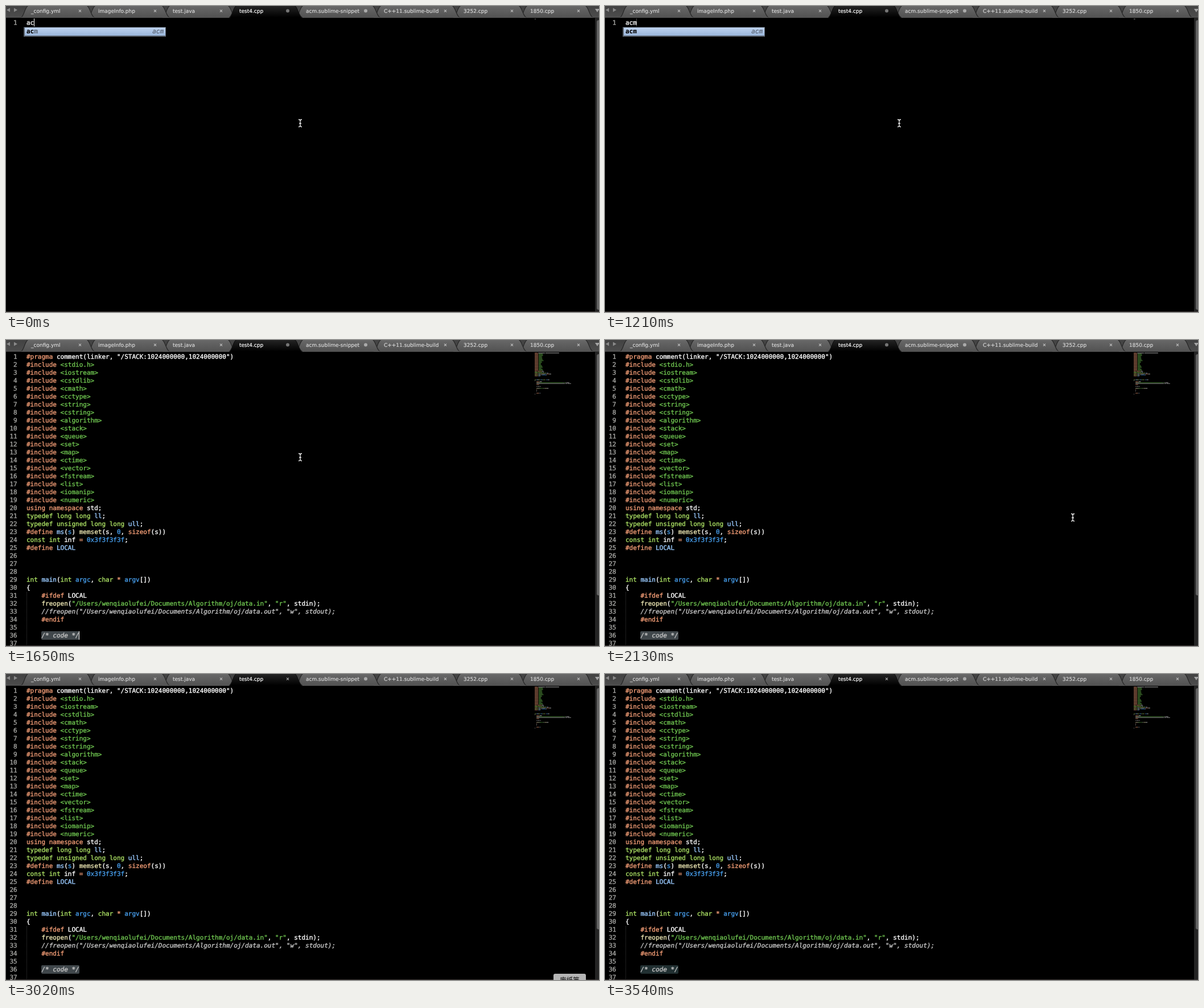
An HTML page with a canvas for the animation above (3640 ms loop, 1042 by 538 pixels).

```html
<!DOCTYPE html>
<html lang="en">
<head>
<meta charset="utf-8">
<title>Snippet expansion in a code editor</title>
<style>
html, body { margin: 0; width: 100%; height: 100%; overflow: hidden; background: #000; }
canvas { display: block; }
</style>
</head>
<body>
<canvas id="stage" width="1042" height="538"></canvas>
<script>
const LOOP = 3640;
const W = 1042, H = 538;
const CODE_X = 36, BASELINE = 33, LINE_H = 14, CHAR_W = 6.622;
const MONO = '11px "DejaVu Sans Mono", monospace';
const UI = '9px "DejaVu Sans", sans-serif';
const ctx = document.getElementById('stage').getContext('2d');
ctx.textRendering = 'geometricPrecision';
ctx.lineJoin = 'round';

// One letter per syntax colour; "~" separates tokens in a line.
const COLORS = {
  w: '#fafafa', o: '#ee9a74', g: '#6cc04e', t: '#a8dc62', b: '#459ae6',
  f: '#9acaff', y: '#e8e2b0', c: '#c4c4c4'
};
const parse = line => line ? line.split('~').map(s => [s[0], s.slice(1)]) : [];
const headers = ('stdio.h iostream cstdlib cmath cctype string cstring algorithm stack queue ' +
  'set map ctime vector fstream list iomanip numeric').split(' ');
const folder = '/Users/wenqiaolufei/Documents/Algorithm/oj/';
const program = [
  'o#pragma ~wcomment(linker, "/STACK:1024000000,1024000000")',
  ...headers.map(h => `o#include ~g<${h}>`),
  'ousing namespace ~wstd;',
  'ttypedef long long ~fll~w;',
  'ttypedef unsigned long long ~full~w;',
  'o#define ~fms~w(~bs~w) ~ymemset~w(s, ~b0~w, ~osizeof~w(s))',
  'tconst int ~winf ~o= ~b0x3f3f3f3f~w;',
  'o#define ~fLOCAL',
  '', '', '',
  'tint ~fmain~w(~tint ~bargc~w, ~tchar ~o* ~bargv~w[])',
  'w{',
  'w    ~o#ifdef ~wLOCAL',
  `w    ~yfreopen~w(~g"${folder}data.in"~w, ~g"r"~w, stdin);`,
  `w    ~c//freopen("${folder}data.out", "w", stdout);`,
  'w    ~o#endif',
  '',
  'w    ~c/* code */',
  '',
  'w    ~yprintf~w(~g"time %d"~w, ~yclock~w());',
  'w    ~o#',
  'w    }',
  'w    }',
  '',
  'w    ~oreturn ~b0~w;',
  'w}'
].map(parse);

// label, text x, close button x
const tabs = [
  ['_config.yml', 44, 130], ['imageInfo.php', 162, 262], ['test.java', 293, 378],
  ['test4.cpp', 410, 495], ['acm.sublime-snippet', 527, 632],
  ['C++11.sublime-build', 664, 772], ['3252.cpp', 804, 889], ['1850.cpp', 921, 1006]
];
const ACTIVE = 3, UNSAVED = 4;

// Stepped tracks: [start time, value]
const caretTrack = [[0, 1], [610, .15], [760, 0], [1210, .3], [1360, .65], [1510, 1],
  [2130, 0], [2580, .5], [2720, 1], [3020, 0]];
const pointerTrack = [[0, [517, 206]], [2130, [822, 312]], [2280, [869, 352]],
  [2430, [947, 416]], [2580, null]];
const tooltipTrack = [[0, 0], [3020, 1], [3170, .45], [3320, 0]];
const valueAt = (track, t) => track.filter(([start]) => start <= t).pop()[1];

function rect(x, y, w, h, fill) {
  ctx.fillStyle = fill;
  ctx.fillRect(x, y, w, h);
}

// A thin outline in the fill colour gives the glyphs a heavier smoothing.
function text(str, x, y, color, font = MONO, align = 'left', weight = .4) {
  ctx.font = font;
  ctx.textAlign = align;
  ctx.fillStyle = ctx.strokeStyle = color;
  ctx.lineWidth = weight;
  ctx.fillText(str, x, y);
  ctx.strokeText(str, x, y);
}

function gradient(y0, y1, from, to) {
  const g = ctx.createLinearGradient(0, y0, 0, y1);
  g.addColorStop(0, from);
  g.addColorStop(1, to);
  return g;
}

function polygon(points, fill) {
  ctx.beginPath();
  points.forEach(p => ctx.lineTo(...p));
  ctx.fillStyle = fill;
  ctx.fill();
}

function rounded(x, y, w, h, r, fill) {
  ctx.beginPath();
  ctx.roundRect(x, y, w, h, r);
  ctx.fillStyle = fill;
  ctx.fill();
}

function dot(x, y, fill) {
  ctx.beginPath();
  ctx.arc(x, y, 3, 0, 7);
  ctx.fillStyle = fill;
  ctx.fill();
}

function cross(x, y, stroke) {
  ctx.beginPath();
  ctx.moveTo(x - 2, y - 2); ctx.lineTo(x + 2, y + 2);
  ctx.moveTo(x + 2, y - 2); ctx.lineTo(x - 2, y + 2);
  ctx.strokeStyle = stroke;
  ctx.lineWidth = 1.2;
  ctx.stroke();
}

function drawTab(index, unsaved) {
  const [label, textX, closeX] = tabs[index];
  const active = index === ACTIVE;
  const left = textX - 18, right = closeX + 26;
  ctx.beginPath();
  ctx.moveTo(left, 20.5);
  ctx.bezierCurveTo(left + 6, 19, left + 7, 0, left + 14, -1);
  ctx.lineTo(right - 15, -1);
  ctx.bezierCurveTo(right - 8, 0, right - 7, 19, right, 20.5);
  ctx.fillStyle = active ? gradient(0, 20, '#242424', '#000') : gradient(0, 20, '#686868', '#525252');
  ctx.fill();
  ctx.strokeStyle = active ? '#111' : '#262626';
  ctx.lineWidth = 1.2;
  ctx.stroke();
  text(label, textX, 11.8, active ? '#fff' : '#d8d8d8', UI, 'left', .2);
  if (unsaved) dot(closeX, 8.5, active ? '#757575' : '#aaa');
  else cross(closeX, 8.7, active ? '#aaa' : '#bdbdbd');
}

function drawTabBar(t) {
  rect(0, 0, W, 20, gradient(0, 20, '#424242', '#4c4c4c'));
  polygon([[1, 7], [7, 3.5], [7, 10.5]], '#8a8a8a');
  polygon([[20, 7], [14, 3.5], [14, 10.5]], '#8a8a8a');
  polygon([[1035, 5], [1043, 5], [1039, 11]], '#a5a5a5');
  for (let i = tabs.length - 1; i >= 0; i--) if (i !== ACTIVE) drawTab(i, i === UNSAVED);
  rect(0, 19.5, W, 1, '#5c5c5c');
  drawTab(ACTIVE, t < 2430);
  rect(394, 20, 125, 2, '#000');
}

function drawScrollbar(bottom) {
  rect(1035, 21, 7, H - 21, '#242424');
  rounded(1038, 25, 6, bottom - 25, 3, '#626262');
  rect(0, 537, W, 1, '#3d3837');
}

function drawCaret(x, y, h, alpha) {
  ctx.globalAlpha = alpha;
  rect(x, y, 1, h, '#fff');
  ctx.globalAlpha = 1;
}

function drawLineNumber(n) {
  text(n, 19.7, BASELINE + (n - 1) * LINE_H, '#a2a29f', MONO, 'right');
}

function drawTyping(t) {
  const typed = t < 140 ? 'ac' : 'acm';
  const width = typed.length * CHAR_W;
  drawLineNumber(1);
  text(typed, CODE_X, BASELINE, COLORS.w);
  drawCaret(Math.floor(CODE_X + width), 22, 14, valueAt(caretTrack, t));
  rect(929, 22.5, typed.length * .9, 1, '#777');

  rect(31, 37, 250, 17, '#59616b');
  rect(33, 38, 247, 14, gradient(38, 52, '#bdd2ee', '#9bb7dc'));
  text(typed, CODE_X, 48, '#000', 'bold ' + MONO, 'left', .1);
  text('acm'.slice(typed.length), CODE_X + width, 48, '#55606e');
  text('acm', 277, 48, '#566070', 'italic ' + MONO, 'right', .2);
}

function drawProgram(t) {
  rounded(62, 512, 67, 15, 2, t < 3540 ? '#40474b' : '#213032');
  for (let y = 443; y < 537; y += 2) rect(36, y, 1, 1, '#3a3a3a');

  program.forEach((tokens, row) => {
    let col = 0;
    if (row < 37) drawLineNumber(row + 1);
    for (const [key, str] of tokens) {
      const font = key === 'c' ? 'italic ' + MONO : MONO;
      if (row < 37) text(str, CODE_X + col * CHAR_W, BASELINE + row * LINE_H, COLORS[key], font);
      ctx.globalAlpha = .65;
      for (const word of str.matchAll(/\S+/g)) {
        rect(929 + (col + word.index) * .78, 22.4 + row * 1.68, word[0].length * .78, 1, COLORS[key]);
      }
      ctx.globalAlpha = 1;
      col += str.length;
    }
  });
  drawCaret(128, 512, 15, valueAt(caretTrack, t));
}

function drawPointer([x, y]) {
  ctx.beginPath();
  for (const s of [-1, 1]) {
    ctx.moveTo(x - 3, y + s * 6.5);
    ctx.quadraticCurveTo(x, y + s * 6.5, x, y + s * 4);
    ctx.quadraticCurveTo(x, y + s * 6.5, x + 3, y + s * 6.5);
  }
  ctx.moveTo(x, y - 5); ctx.lineTo(x, y + 5);
  ctx.moveTo(x - 2, y + .5); ctx.lineTo(x + 2, y + .5);
  ctx.strokeStyle = '#eee';
  ctx.lineWidth = 1.3;
  ctx.stroke();
}

function drawTooltip(alpha) {
  ctx.globalAlpha = alpha;
  rounded(962, 527, 57, 20, 3, '#b5b5b5');
  text('废纸篓', 990.5, 541.5, '#111', '11.5px "Noto Sans CJK SC", "Noto Sans CJK", sans-serif', 'center', .1);
  ctx.globalAlpha = 1;
}

function draw() {
  const t = performance.now() % LOOP;
  const expanded = t >= 1650;
  rect(0, 0, W, H, '#000');
  drawTabBar(t);
  drawScrollbar(expanded ? 449 : 534);
  (expanded ? drawProgram : drawTyping)(t);
  const pointer = valueAt(pointerTrack, t);
  if (pointer) drawPointer(pointer);
  drawTooltip(valueAt(tooltipTrack, t));
  requestAnimationFrame(draw);
}
draw();
</script>
</body>
</html>
```
